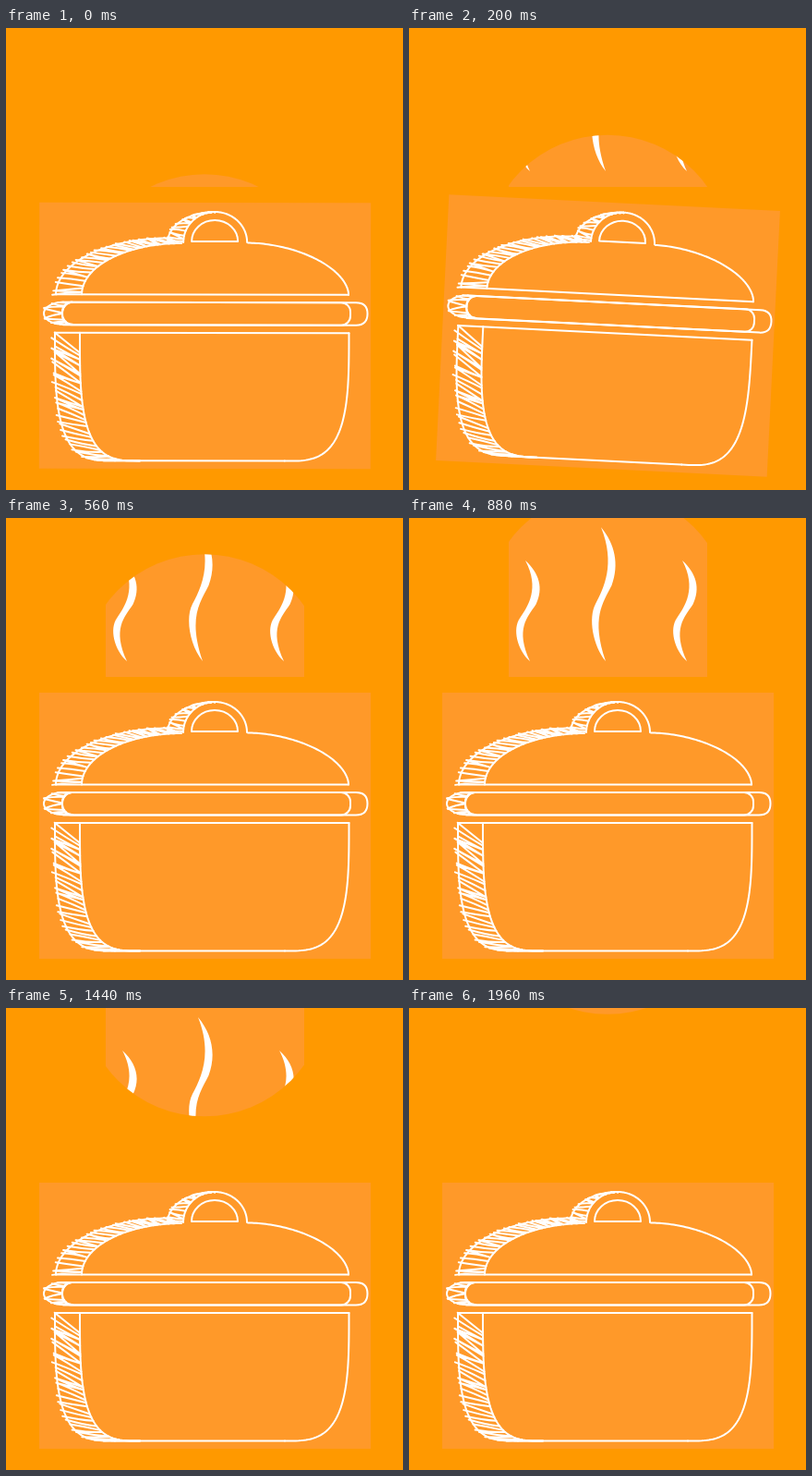
An HTML page that plays this animation: 430x500 px, repeating every 2 s.

```html
<!DOCTYPE html>
<html>
<head>
<meta charset="utf-8">
<style>
html, body { margin: 0; width: 100%; height: 100%; overflow: hidden; background: #f90; }
svg { display: block; }
.tint { fill: #ff9929; }
.ink { fill: none; stroke: #fff; stroke-width: 2; stroke-linejoin: round; stroke-linecap: round; }
</style>
</head>
<body>
<svg width="430" height="500" viewBox="0 0 430 500">
  <defs>
    <clipPath id="reveal"><circle id="hole" cx="215" cy="291" r="132.5"/></clipPath>
    <path id="wisp" fill="#fff" d="M208 10C223 28 228 50 219.500 73C210 92 197 108 213 155C199 138 194 108 202 93C211 76 224 50 208 10Z"/>
  </defs>
  <g clip-path="url(#reveal)">
    <rect class="tint" x="108" width="215" height="172"/>
    <use href="#wisp"/>
    <use href="#wisp" transform="translate(-82 38.5) scale(1 .752)"/>
    <use href="#wisp" transform="translate(88 38.5) scale(1 .752)"/>
  </g>
  <g id="pot">
    <rect class="tint" x="36" y="189" width="359" height="288"/>
    <g class="ink" id="ink">
      <path d="M54 288.500H371M53 330H371.500M118 468.500H302"/>
      <path d="M201 231A25 23 0 0 1 251 231Z"/>
      <rect x="61" y="297" width="312" height="24.500" rx="10"/>
      <path d="M62 297H379Q391.500 297 391.500 309Q391.500 321.500 379 321.500H62"/>
    </g>
  </g>
</svg>
<script>
const get = id => document.getElementById(id);
let seed = 7;
const random = () => (seed = seed * 16807 % 2147483647) / 2147483647;

function ink(d) {
  const path = document.createElementNS("http://www.w3.org/2000/svg", "path");
  path.setAttribute("d", d);
  return get("ink").appendChild(path);
}

// Part of a superellipse, in quarter turns; power 1 is an ellipse, less is squarer
function arc(cx, cy, rx, ry, power = 1, from = 0, to = 1) {
  const bend = v => Math.sign(v) * Math.abs(v) ** power;
  const points = [];
  for (let i = 0; i <= 60; i++) {
    const a = (from + (to - from) * i / 60) * Math.PI / 2;
    points.push([cx + rx * bend(Math.cos(a)), cy + ry * bend(Math.sin(a))]);
  }
  return ink("M" + points.join("L"));
}

// Loose pen strokes between two edges, some joined, overshooting the outer one
function hatch(outer, inner, gap, lean = 0) {
  const on = (edge, u) => edge.getPointAtLength(edge.getTotalLength() * Math.min(1, Math.max(0, u)));
  const count = Math.round(outer.getTotalLength() / gap);
  let d = "";
  for (let i = 0; i <= count; i++) {
    const u = i / count, slip = (random() - .5) / count;
    const a = on(outer, u + slip), b = on(inner, u - slip + lean * (1 - u));
    const over = random() * .15, sag = random() * 4 - 2;
    const x = a.x + (a.x - b.x) * over, y = a.y + (a.y - b.y) * over;
    d += `${i && random() < .35 ? "L" : "M"}${x} ${y}Q${(x + b.x) / 2 + sag} ${(y + b.y) / 2 + sag} ${b.x} ${b.y}`;
  }
  ink(d);
}

const dome = arc(190, 288.5, -108, -55.5);
const knob = arc(226, 232, -34, -33);
const rim = arc(72, 309, -11, 12, 1, -1);
const body = arc(145, 330, -65, 138.5, .6);
hatch(arc(176, 288.5, -122, -61), dome, 6);
hatch(arc(226, 232, -51, -33), knob, 5);
hatch(arc(62, 309, -21, 12, 1, -1), rim, 6);
hatch(arc(118, 330, -65, 138.5, .6), body, 6, .12);

// Right-hand outlines
arc(262, 288.5, 109, -56, 1.1);
arc(226, 232, 35, -33);
arc(302, 330, 69.5, 138.5, .6);

const start = performance.now();
function draw() {
  const t = (performance.now() - start) % 2000;
  const angle = t < 240 ? 5.8 * Math.sin(Math.PI * t / 240) : 0;
  get("hole").setAttribute("cy", 291 - .2125 * t);
  get("pot").setAttribute("transform", `rotate(${angle} 215.5 333)`);
  requestAnimationFrame(draw);
}
draw();
</script>
</body>
</html>
```
